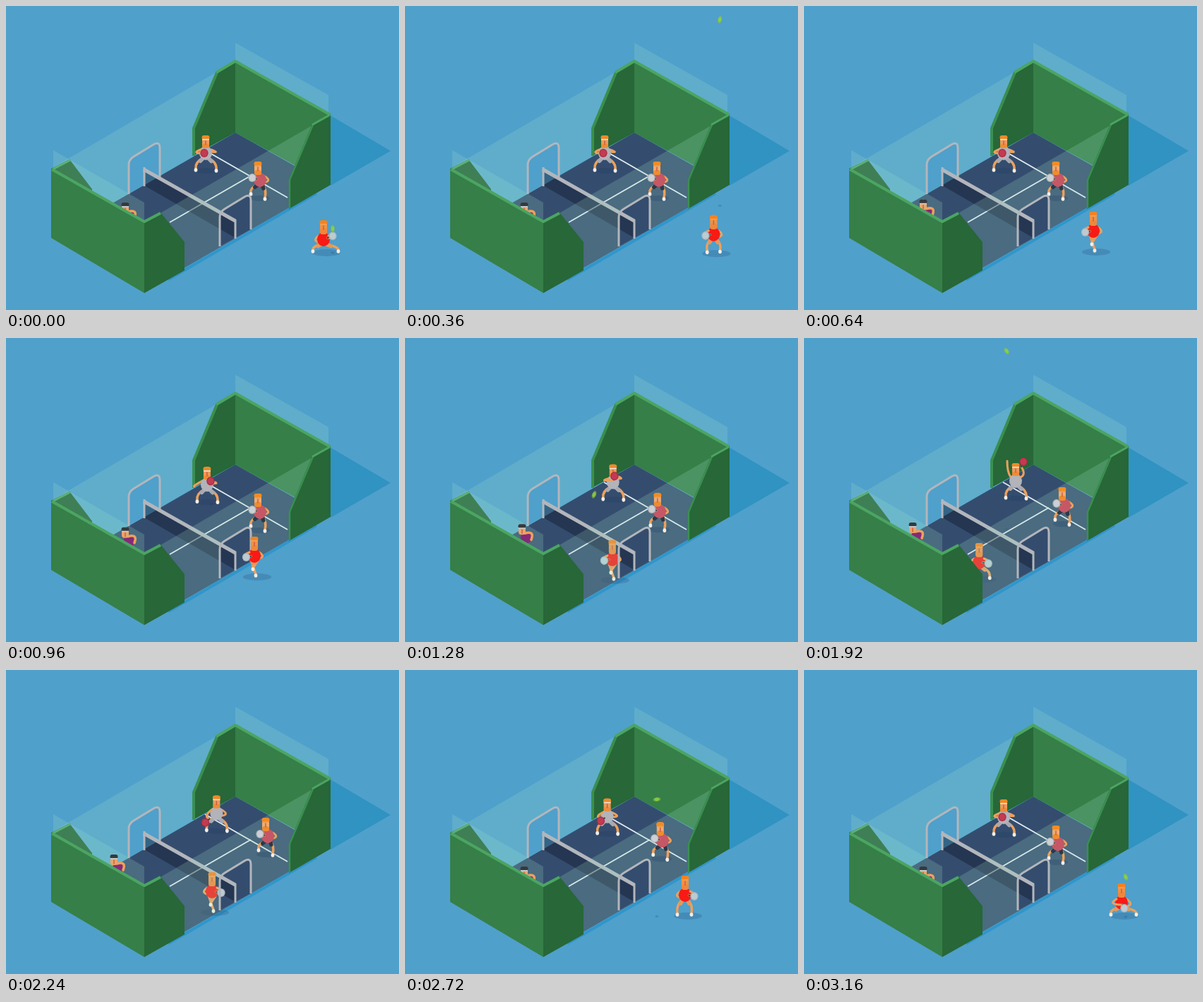
An HTML page with a canvas for the animation above (3.2 s loop, 557 px wide and 430 px high).

```html
<!DOCTYPE html>
<html lang="en">
<head>
<meta charset="utf-8">
<title>Padel rally</title>
<style>
html, body { margin: 0; width: 100%; height: 100%; overflow: hidden; background: #4fa0cb; }
canvas { display: block; width: 557px; height: 430px; }
</style>
</head>
<body>
<canvas id="stage" width="557" height="430"></canvas>
<script>
const g = document.getElementById('stage').getContext('2d');
const LOOP = 3200, STEP = 40;
const GREEN = '#367f48', DARK = '#276738', EDGE = '#4ba562', SLOPE = '#3a8f50', GREY = '#b3b6bc';
const GLASS = 'rgba(162,222,200,.2)', SKIN = '#eda05c', SHADE = 'rgba(22,48,92,.18)';

const lerp = (a, b, p) => a + (b - a) * p;
const clamp = p => Math.max(0, Math.min(1, p));
const smooth = p => p * p * (3 - 2 * p);
const ramp = (t, from, to) => smooth(clamp((t - from) / (to - from)));
const pulse = (t, mid, half) => smooth(clamp(1 - Math.abs(t - mid) / half));

// Key rows start with their time; returns the pair around t and the progress.
function between(rows, t) {
  const n = rows.findIndex(r => r[0] > t);
  const a = rows[n - 1], b = rows[n];
  return [a, b, (t - a[0]) / (b[0] - a[0])];
}

function trace(pts) {
  g.moveTo(pts[0], pts[1]);
  for (let i = 2; i < pts.length; i += 2) g.lineTo(pts[i], pts[i + 1]);
}
function poly(color, ...pts) {
  g.beginPath(); trace(pts); g.closePath();
  g.fillStyle = color; g.fill();
}
function line(color, width, ...pts) {
  g.beginPath(); trace(pts);
  g.strokeStyle = color; g.lineWidth = width; g.stroke();
}
function oval(color, x, y, rx, ry = rx, turn = 0) {
  g.beginPath(); g.ellipse(x, y, rx, ry, turn, 0, 7);
  g.fillStyle = color; g.fill();
}
function limb(color, width, x0, y0, cx, cy, x1, y1) {
  g.beginPath(); g.moveTo(x0, y0); g.quadraticCurveTo(cx, cy, x1, y1);
  g.strokeStyle = color; g.lineWidth = width; g.stroke();
}
function pill(color, x, y, w, h, r) {
  g.beginPath(); g.roundRect(x - w / 2, y, w, h, r);
  g.fillStyle = color; g.fill();
}

// Door arch, x and y at the foot of its left post.
function archPath(x, y) {
  g.moveTo(x, y);
  g.lineTo(x, y - 41);
  g.quadraticCurveTo(x, y - 49, x + 7, y - 53);
  g.lineTo(x + 35, y - 70);
  g.quadraticCurveTo(x + 44, y - 75, x + 44, y - 65);
  g.lineTo(x + 44, y - 24);
}
function arch(x, y) {
  g.beginPath(); archPath(x, y);
  g.strokeStyle = GREY; g.lineWidth = 3; g.stroke();
}
function sideGlass(x, y, ...pts) {
  g.beginPath(); trace(pts); g.closePath();
  archPath(x, y); g.closePath();
  g.fillStyle = GLASS; g.fill('evenodd');
}

function backdrop() {
  g.fillStyle = '#4fa0cb';
  g.fillRect(0, 0, 557, 430);
  poly('#3093c2', 460, 155, 545, 205, 460, 254);
  sideGlass(174, 266, 64, 230, 325, 78, 325, 179, 64, 328);
  poly(GLASS, 325, 52, 457, 126, 457, 153, 325, 78);
  line('#3096cb', 4, 230, 387, 440, 265);
  poly('#344d6e', 325, 179, 457, 253, 196, 403, 66, 328);
  line('#e4ebef', 1.8, 282, 204, 399, 271);
  line('#e4ebef', 1.8, 232, 306, 347, 240);
  poly(GREEN, 325, 78, 460, 154, 460, 253, 325, 179);
  poly(DARK, 325, 78, 299, 93, 265, 173, 265, 212, 325, 179);
  line(SLOPE, 4, 266, 212, 266, 173, 299, 94);
  line(EDGE, 4, 298, 94, 325, 78, 460, 154);
  poly(DARK, 64, 230, 90, 217, 122, 259, 122, 296, 64, 328);
  line(EDGE, 3, 66, 231, 91, 218);
  arch(174, 266);
}

function net() {
  poly('rgba(18,28,48,.45)', 196, 231, 325, 304, 325, 328, 196, 254);
  line(GREY, 3, 196, 228, 196, 255);
  line(GREY, 3, 325, 302, 325, 329);
  line(GREY, 5, 195, 231, 325, 304);
}

function glass() {
  sideGlass(303, 340, 460, 154, 196, 306, 196, 403, 457, 253);
  poly(GLASS, 67, 204, 196, 278, 196, 305, 67, 231);
}

function frontWalls() {
  arch(303, 340);
  poly(DARK, 460, 154, 434, 167, 401, 246, 401, 287, 460, 253);
  line(SLOPE, 2.5, 402, 286, 402, 246, 435, 168);
  line(EDGE, 3, 434, 168, 459, 154);
  poly(DARK, 196, 305, 219, 292, 253, 334, 253, 374, 196, 406);
  poly(GREEN, 64, 230, 196, 305, 196, 406, 64, 328);
  line(EDGE, 4, 65, 231, 196, 305, 219, 293);
}

function head(x, top, height, look) {
  pill(look.face, x, top, 10, height, 4);
  pill(look.hair, x, top, 11, 6, 3);
  pill(look.band, x, top + 5, 10, 1.6, 0);
  if (look.beard) pill(look.beard, x, top + 12, 10, height - 12, 4);
  line('#cf5a3c', 1.4, x, top + 8, x, top + 13);
}

function arm(x, y, side, hx, hy) {
  const bow = Math.max(8, 22 - .35 * Math.abs(hy));
  limb(SKIN, 3, x + 7 * side, y - 5, x + bow * side, y + hy / 2 + 1, x + hx, y + hy);
}

// Racket, free hand and feet are offsets from the body.
function player(look, x, y, { racket: [rx, ry], hand, feet }) {
  const reach = Math.hypot(rx, ry) || 1;
  const hold = 1 - Math.min(8 / reach, .6);
  const side = rx > 4 ? 1 : -1;
  feet.forEach(([fx, fy], i) => {
    const s = i ? 1 : -1, rise = fy - 7;
    limb(SKIN, 3.5, x + 4 * s, y + 7, x + fx * .8 + 4 * s, y + 7 + rise * .35, x + fx, y + fy - 2);
    line(look.shorts, 5.5, x + 3.5 * s, y + 7, x + fx * .4 + 2 * s, y + 7 + rise * .25);
    oval('#f2eee9', x + fx, y + fy, 2.4, 2.8);
  });
  arm(x, y, -side, ...hand);
  oval(look.shirt, x, y, 9, 10);
  head(x + look.lean, y - look.tall, look.tall - 7, look);
  arm(x, y, side, rx * hold, ry * hold);
  line('#39424e', 2, x + rx * hold, y + ry * hold, x + rx, y + ry);
  oval(look.rim, x + rx, y + ry, 5.7, 6.1);
  oval(look.strings, x + rx, y + ry, 4.4, 4.8);
}

const looks = {
  grey: { shirt: '#b3b3ba', shorts: '#a8a9b2', hair: '#ef8a26', face: '#eb9a5c', band: '#efe2d8',
    beard: '#ee8c35', strings: '#c33b52', rim: '#a92c44', tall: 25, lean: 0 },
  pink: { shirt: '#c65766', shorts: '#2b3947', hair: '#f28c24', face: '#ecab78', band: '#ef9a3e',
    beard: '#ef8c2f', strings: '#cdd0d3', rim: '#a9b0b6', tall: 26, lean: -3 },
  red: { shirt: '#f81a15', shorts: '#e3995c', hair: '#f58220', face: '#ef9148', band: '#f7a04c',
    beard: '#f0873a', strings: '#bccbd2', rim: '#a3b4bd', tall: 27, lean: 0 },
  purple: { hair: '#343a3f', face: '#e9a56b', band: '#c9cfd0' }
};

// Volleys, backs up, smashes, then walks back.
function drawGrey(t) {
  const away = ramp(t, 800, 1560) - ramp(t, 2060, 3000);
  const up = ramp(t, 1160, 1480) - ramp(t, 2060, 2180);
  const low = ramp(t, 2100, 2220) - ramp(t, 2300, 3160);
  const volley = pulse(t, 960, 180);
  const x = 283 + 17 * away, y = 208 - 6 * away;
  oval(SHADE, x + 1, y + 25, 16, 4);
  player(looks.grey, x, y, {
    racket: [-2 + 13 * up - 14 * low + 7 * volley, -27 * up + 13 * low - 5 * volley],
    hand: [8 - 20 * up - 4 * low - 26 * volley, -2 - 26 * up + 6 * low + 5 * volley],
    feet: [[-14, 24], [15, 25]]
  });
}

function drawPink(t) {
  const shift = 11 * (ramp(t, 1080, 2240) - ramp(t, 2240, 3120));
  const x = 360 + shift, y = 246 - shift;
  oval(SHADE, x - 1, y + 26, 15, 4);
  player(looks.pink, x, y, { racket: [-11, -3], hand: [-4, 5], feet: [[-13, 20], [7, 27]] });
}

function drawPurple(t) {
  const home = 1 - ramp(t, 2240, 2720);
  const x = 169 - 16 * ramp(t, 960, 2100) * home;
  const top = 278 - 17 * Math.sin(clamp((t - 440) / 1260) * Math.PI / 2) * home;
  oval('#852a78', x + 6, top + 19, 8, 8);
  limb(SKIN, 3.6, x + 4, top + 13, x + 18, top + 9, x + 13, top + 22);
  head(x, top, 15, looks.purple);
}

// time, x, y
const redPath = [
  [0, 450, 330], [400, 436, 322], [640, 410, 318], [960, 352, 308], [1560, 243, 317],
  [2040, 250, 317], [2240, 292, 313], [2720, 397, 318], [3160, 450, 329], [LOOP, 450, 330]
];
function redAt(t) {
  const [a, b, p] = between(redPath, t);
  return [lerp(a[1], b[1], p), lerp(a[2], b[2], p)];
}

function drawRed(t) {
  const [x, y] = redAt(t);
  const run = ramp(t, 300, 560) - ramp(t, 1440, 1560) + ramp(t, 2040, 2180) - ramp(t, 2600, 2720);
  const lunge = 1 - ramp(t, 120, 480) + ramp(t, 1440, 1560) - ramp(t, 1800, 2040) + ramp(t, 2760, 3120);
  const windup = pulse(t, 3160, 160);
  const right = 1 - ramp(t, 20, 160) + ramp(t, 1560, 1700);
  const drop = 28 - 11 * lunge;
  const stride = Math.PI * t / 160;
  const foot = (side, stand) => [
    lerp(stand, side * (2 + 11 * Math.sin(stride)), run),
    lerp(drop, 28 - 9 * Math.max(0, -side * Math.cos(stride)), run)
  ];
  oval(SHADE, x + 4, y + lerp(drop, 28, run) + 2, 20, 5);
  player(looks.red, x, y, {
    racket: [-11.5 + 24.5 * right - 9 * windup, 2 + 6 * windup - 14 * pulse(t, 1640, 120) - 8 * pulse(t, 40, 160)],
    hand: [-4 + 8 * right, 6],
    feet: [foot(1, -11 - 4 * lunge), foot(-1, 9 + 12 * lunge)]
  });
}

// Contacts: time, x, y, height over the ground, arc of the flight that follows.
const contacts = [
  [0, 463, 315, 34, 258], [600, 435, 235, 3, 10], [960, 291, 203, 32, 40],
  [1600, 245, 320, 28, 223], [2100, 311, 170, 56, 0], [2240, 249, 345, 3, 147], [LOOP, 465, 315, 34, 0]
];
function drawBall(t) {
  const [a, b, p] = between(contacts, t);
  const x = lerp(a[1], b[1], p), arc = a[4];
  const y = lerp(a[2], b[2], p) - 4 * arc * p * (1 - p);
  const turn = Math.atan2(b[2] - a[2] - 4 * arc * (1 - 2 * p), b[1] - a[1]);
  oval(SHADE, x, lerp(a[2] + a[3], b[2] + b[3], p), 2.5, 1.5);
  oval('rgba(132,196,62,.65)', x, y, 5.4, 2.9, turn);
  oval('rgba(150,212,66,.7)', x, y, 3.2, 2.2, turn);
}

function draw(t) {
  const outside = redAt(t)[0] > 322;
  const ballOut = t < 400 || t > 2400;
  g.lineJoin = 'round';
  g.lineCap = 'butt';
  backdrop();
  if (!ballOut) drawBall(t);
  g.lineCap = 'round';
  drawGrey(t);
  g.lineCap = 'butt';
  net();
  g.lineCap = 'round';
  if (!outside) drawRed(t);
  glass();
  drawPink(t);
  drawPurple(t);
  g.lineCap = 'butt';
  frontWalls();
  g.lineCap = 'round';
  if (outside) drawRed(t);
  if (ballOut) drawBall(t);
}

const start = performance.now();
function tick() {
  const t = (performance.now() - start) % LOOP;
  draw(Math.floor(t / STEP) * STEP);
  requestAnimationFrame(tick);
}
tick();
</script>
</body>
</html>
```
